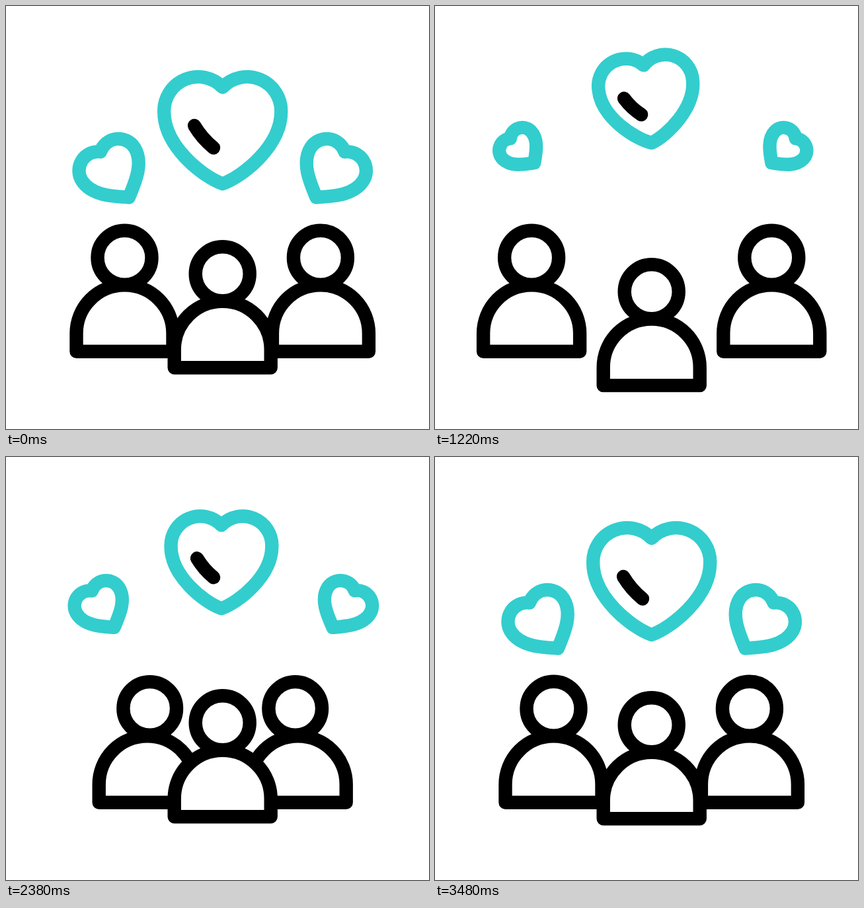
Write an HTML page that moves like this. It is 640 by 640 pixels and loops after 3600 ms.

```html
<!DOCTYPE html>
<html lang="en">
<head>
<meta charset="utf-8">
<title>People and hearts</title>
<style>
  html, body { margin: 0; width: 100%; height: 100%; overflow: hidden; background: #fff; }
  svg { display: block; width: 100vw; height: 100vh; }
  path, circle { stroke-linecap: round; stroke-linejoin: round; }
</style>
</head>
<body>
<svg id="stage" viewBox="0 0 640 640"></svg>
<script>
const LOOP = 3600, MID = 327.7, LINE = 20.4, TEAL = '#33cdcd', INK = '#000';
const stage = document.getElementById('stage');

function add(tag, attrs, parent = stage) {
  const el = document.createElementNS('http://www.w3.org/2000/svg', tag);
  for (const k in attrs) el.setAttribute(k, attrs[k]);
  return parent.appendChild(el);
}

const ramp = (t, a, b) => Math.min(1, Math.max(0, (t - a) / (b - a)));
const soft = (t, a, b) => (1 - Math.cos(Math.PI * ramp(t, a, b))) / 2;
// Rises from 0 at a to 1 at top, then falls evenly to 0 at b.
const hump = (t, a, top, b, power = 1) =>
  t < top ? ramp(t, a, top) ** power : 1 - ramp(t, top, b);

// ---- people: origin at the middle of the base line
const BODY = 'M-73 0V-27.5A73 73 0 0 1 73 -27.5V0Z';
const inked = { fill: '#fff', stroke: INK, 'stroke-width': LINE };

function person() {
  const head = add('circle', inked);
  const body = add('path', { d: BODY, ...inked });
  return (bodyX, headX, y, size = 1) => {
    body.setAttribute('transform', `translate(${bodyX} ${y})`);
    head.setAttribute('cx', headX);
    head.setAttribute('cy', y - 142 - 30 * (1 - size));
    head.setAttribute('r', 51.2 * size - LINE / 2);
  };
}
const left = person(), right = person(), centre = person();

// Drift out to +far, snap in to -near, settle back at 0.
function sway(t, far, near, back, end) {
  if (t < 1385) return far * ramp(t, 80, 1385) ** 1.53;
  return far - (far + near) * soft(t, 1385, 2130) + near * soft(t, back, end);
}

function drawPeople(t) {
  const body = 148.2 + sway(t, 41, 34.2, 2410, 3240);
  const head = 148.2 + sway(t, 41, 38.2, 2510, 3460);
  const size = 1 - 0.023 * hump(t, 1900, 2740, 3450);
  left(MID - body, MID - head, 522.8, size);
  right(MID + body, MID + head, 522.8, size);
  centre(MID, MID, 547.3 + sway(t, 33, 3, 2510, 3460));
}

// ---- hearts: origin at the tip, axis pointing up
function heartPath(w, y, r, notch, c1, c2x, c2y) {
  return `M0 ${-notch}A${r} ${r} 0 0 0 ${-w} ${-y}C${-w} ${-c1} ${-c2x} ${-c2y} 0 0` +
         `C${c2x} ${-c2y} ${w} ${-c1} ${w} ${-y}A${r} ${r} 0 0 0 0 ${-notch}Z`;
}
const SMALL = heartPath(47, 59.2, 28.7, 81.2, 31.5, 18, 13);
const BIG = heartPath(88.5, 109, 51.4, 146, 57, 30.7, 11);

// The line keeps its weight while the heart shrinks.
function heart(d, shine) {
  const g = add('g', { fill: 'none' });
  add('path', { d, stroke: TEAL }, g);
  if (shine) add('path', { d: shine, stroke: INK }, g);
  return ({ x, y, turn, size }) => {
    g.setAttribute('transform', `translate(${x} ${y}) rotate(${turn}) scale(${size})`);
    g.setAttribute('stroke-width', LINE / size);
  };
}
const leftHeart = heart(SMALL), rightHeart = heart(SMALL);
const bigHeart = heart(BIG, 'M-42.7 -88Q-31 -68.5 -13.7 -54.5');

const bigPose = t => ({
  x: MID + 5 * hump(t, 1500, 1950, 2270) - 7.7 * hump(t, 2270, 2740, 3280),
  y: 269 - 112 * hump(t, 400, 1710, 2750, 1.27),
  size: 1 - 0.345 * hump(t, 400, 1820, 2750, 1.08),
  turn: -13.7 * hump(t, 480, 1869, 2380, 1.35) + 9.7 * hump(t, 2380, 2740, 3280)
});

// side is -1 or 1; reach is the outward travel, swing the turn back past rest
const sidePose = (t, side, reach, swing) => ({
  x: MID + side * (141.7 + reach * hump(t, 490, 1645, 2855, 1.03)),
  y: 289.5 - 81.3 * hump(t, 430, 1660, 2840),
  size: 1 - 0.511 * hump(t, 450, 1645, 2860, 0.78),
  turn: side * (32 + 20.4 * hump(t, 520, 1630, 2350, 1.05) - swing * hump(t, 2350, 2740, 3470))
});

// ---- short rays on both sides of the big heart
const rays = add('g', { stroke: TEAL, 'stroke-width': LINE, fill: 'none' });
const rayLines = [];
for (const side of [-1, 1])
  for (const row of [-1, 0, 1]) {
    const place = `translate(${side * 112.5} ${row * 31.5}) scale(${side} 1) rotate(${row * 20})`;
    rayLines.push(add('path', { transform: place }, rays));
  }

function drawRays(t, { x, y, turn, size }) {
  const show = hump(t, 1350, 1580, 1860);
  rays.setAttribute('opacity', show);
  rays.setAttribute('transform',
    `translate(${x} ${y}) rotate(${turn - 1.5}) translate(0 ${-79 * size})`);
  rayLines.forEach(p => p.setAttribute('d', `M-2.5 0H${8 * show - 2.5}`));
}

function draw(t) {
  const big = bigPose(t);
  drawPeople(t);
  leftHeart(sidePose(t, -1, 57.3, 9));
  rightHeart(sidePose(t, 1, 64, 15));
  bigHeart(big);
  drawRays(t, big);
}

const start = performance.now();
function tick() {
  draw((performance.now() - start) % LOOP);
  requestAnimationFrame(tick);
}
tick();
</script>
</body>
</html>
```
